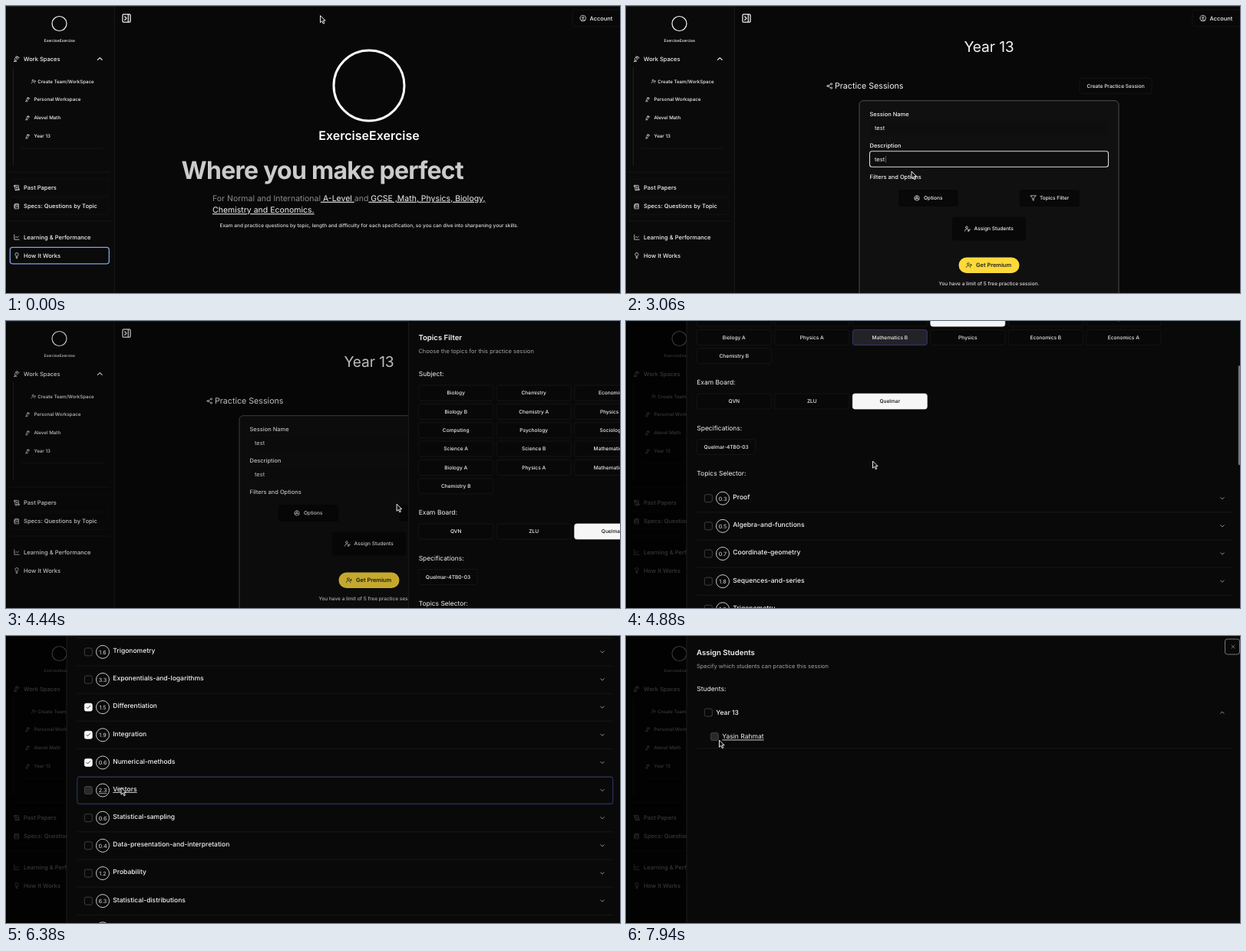
An HTML page for the animation above (8000 ms loop, 800x375 px).

```html
<!DOCTYPE html>
<html lang="en">
<head>
<meta charset="utf-8">
<title>Study workspace</title>
<style>
html, body { margin: 0; height: 100%; overflow: hidden; background: #080808; }
svg { display: block; width: 100vw; height: 100vh; font-family: Inter, "Liberation Sans", sans-serif; }
text { white-space: pre; text-rendering: geometricPrecision; }
</style>
</head>
<body>
<svg id="stage" viewBox="0 0 800 375"></svg>
<script>
const LOOP = 8000, SHEET_X = 79, SHEET_W = 721;

// ---- drawing helpers: all return markup; text y is the middle of the line
const text = (x, y, size, str, { w = 500, c = '#f4f4f4', a = 'start', more = '' } = {}) =>
  `<text x="${x}" y="${y + size * 0.36}" font-size="${size}" font-weight="${w}" fill="${c}" text-anchor="${a}" ${more}>${str}</text>`;
const mid = (x, y, size, str, o = {}) => text(x, y, size, str, { ...o, a: 'middle' });
const rect = (x, y, w, h, r = 0, fill = 'none', stroke = 'none', sw = 0.7) =>
  `<rect x="${x}" y="${y}" width="${w}" height="${h}" rx="${r}" fill="${fill}" stroke="${stroke}" stroke-width="${sw}"/>`;
const line = (x, y, x2, y2, c = '#1b1b1b') =>
  `<path d="M${x} ${y}L${x2} ${y2}" stroke="${c}" stroke-width=".8"/>`;
const group = (body, attrs = '') => `<g ${attrs}>${body}</g>`;
const circle = (x, y, r) => `M${x - r} ${y}a${r} ${r} 0 1 0 ${2 * r} 0a${r} ${r} 0 1 0 ${-2 * r} 0`;

const person = circle(9, 7, 4) + 'M2 21v-1a6 6 0 0 1 6-6h3a6 6 0 0 1 6 6v1';
const ICONS = {
  lamp: 'm14 5-3 3 2 7 8-8-7-2Zm0 0-3 3-3-3 3-3 3 3ZM9.5 6.5 4 12l3 6M3 22v-2c0-1.1.9-2 2-2h4a2 2 0 0 1 2 2v2H3Z',
  scroll: 'M8 21h12a2 2 0 0 0 2-2v-2H10v2a2 2 0 1 1-4 0V5a2 2 0 1 0-4 0v3h4M19 17V5a2 2 0 0 0-2-2H4M15 8h-5M15 12h-5',
  specs: 'M5 4h14v17H5zM9 2v4M15 2v4M2 9h6M2 15h6M11 10h5M11 14h5',
  chart: 'M3 3v18h18M19 9l-5 5-4-4-3 3',
  bulb: 'M15 14c.2-1 .7-1.7 1.5-2.5 1-.9 1.5-2.2 1.5-3.5A6 6 0 0 0 6 8c0 1 .2 2.2 1.5 3.5.7.7 1.3 1.5 1.5 2.5zM9 18h6M10 22h4',
  up: 'M18 15l-6-6-6 6',
  down: 'M6 9l6 6 6-6',
  cross: 'M18 6 6 18M6 6l12 12',
  check: 'M20 6 9 17l-5-5',
  panel: 'M5 3h14a2 2 0 0 1 2 2v14a2 2 0 0 1-2 2H5a2 2 0 0 1-2-2V5a2 2 0 0 1 2-2zM16 3v18M8 8l4 4-4 4',
  account: circle(12, 12, 10) + circle(12, 10, 3) + 'M7 20.7V19a2 2 0 0 1 2-2h6a2 2 0 0 1 2 2v1.7',
  share: circle(18, 5, 3) + circle(6, 12, 3) + circle(18, 19, 3) + 'M8.6 13.5l6.8 4M15.4 6.5l-6.8 4',
  gear: circle(12, 12, 9) + circle(12, 12, 3) + 'M12 3v6M4 16l5-2.5M20 16l-5-2.5',
  filter: 'M22 3H2l8 9.5V19l4 2v-8.5z',
  addUser: person + 'M19 8v6M16 11h6',
  editUser: person + 'M14 19l6-6 2 2-6 6h-2z',
  loader: 'M21 12a9 9 0 1 1-6.2-8.6'
};
const icon = (name, x, y, size, c = '#eee', sw = 2, turn = 0) =>
  `<path d="${ICONS[name]}" transform="translate(${x} ${y}) rotate(${turn}) scale(${size / 24}) translate(-12 -12)" fill="none" stroke="${c}" stroke-width="${sw}" stroke-linecap="round" stroke-linejoin="round"/>`;
const checkbox = (x, y, on, hover) =>
  rect(x - 5, y - 5, 10, 10, 2.2, on ? '#fafafa' : hover ? '#292929' : 'none', on ? '#fafafa' : '#555') +
  (on ? icon('check', x, y, 7, '#111', 2.8) : '');
const button = (x, y, w, h, str, o = {}) =>
  rect(x, y - h / 2, w, h, 3, o.fill || '#080808', o.stroke || '#1b1b1b') +
  mid(x + w / 2, y, 6.6, str, { c: o.c || '#eee' });
const closeButton = rect(780.5, 4, 19, 20, 3, 'none', '#777', 1) + icon('cross', 791, 14, 8, '#999');

// ---- timing helpers
const ease = (t, a, b) => {
  const u = Math.min(1, Math.max(0, (t - a) / (b - a)));
  return u * u * (3 - 2 * u);
};
const track = (keys, t) => {
  const i = keys.findIndex(k => k[0] > t);
  if (i === 0) return keys[0].slice(1);
  if (i < 0) return keys[keys.length - 1].slice(1);
  const a = keys[i - 1], b = keys[i], u = ease(t, a[0], b[0]);
  return a.slice(1).map((v, j) => v + (b[j + 1] - v) * u);
};
const between = (t, a, b) => t >= a && t < b;
const typed = (str, t, start) => str.slice(0, Math.max(0, Math.floor((t - start) / 50)));

const POINTER = [
  [60, 409.5, 12.5], [300, 546, 110], [780, 70, 173], [900, 68, 173], [1330, 68, 173],
  [1650, 724, 118], [1720, 724, 118], [1850, 640, 104], [1930, 640, 104], [2220, 400, 160],
  [2700, 400, 160], [2790, 376, 201], [2850, 376, 201], [3000, 372, 216], [3070, 372, 216],
  [3180, 394, 252], [3270, 394, 252], [3800, 107, 114], [4060, 107, 114], [4280, 552, 252],
  [4350, 552, 252], [4680, 321.5, 183], [5300, 321.5, 183], [5600, 150, 95], [5760, 150, 95],
  [5910, 150, 128], [5970, 150, 128], [6120, 150, 162], [6180, 150, 162], [6340, 150, 198],
  [6480, 150, 198], [6620, 66, 166], [7000, 66, 166], [7230, 473, 291], [7290, 473, 291],
  [7520, 140, 100], [7610, 140, 100], [7740, 118, 181], [7810, 118, 181], [7930, 121.5, 136]
];
const SCROLL = [[4740, 0], [4880, 170], [5450, 525.5]];

// ---- fixed parts
const sidebar =
  rect(0, 0, 141, 375, 0, '#0a0a0a') + line(141.3, 0, 141.3, 375, '#202020') +
  `<circle cx="69.5" cy="23" r="9.5" fill="none" stroke="#f4f4f4" stroke-width="1.2"/>` +
  mid(69.7, 44.7, 5, 'ExerciseExercise') +
  icon('lamp', 14, 69, 8.5) + text(23, 69, 7.5, 'Work Spaces') + icon('up', 122.3, 69, 11.5, '#f4f4f4', 2.4) +
  line(9.4, 80, 9.4, 208, '#2a2a2a') +
  icon('addUser', 36, 98.5, 6.5) + text(41.3, 98.5, 6.13, 'Create Team/WorkSpace') +
  ['Personal Workspace', 'Alevel Math', 'Year 13'].map((s, i) =>
    icon('lamp', 28.5, 122 + 24.1 * i, 6.5) + text(36.4, 122 + 24.1 * i, 6.2, s)).join('') +
  line(20, 186, 126, 186) + line(4, 217, 136, 217) + line(4, 281, 136, 281) +
  rect(5, 226.5, 129, 22, 3, 'none', '#141414') + rect(5, 250.5, 129, 22, 3, 'none', '#141414') +
  [['scroll', 237.5, 'Past Papers'], ['specs', 261.7, 'Specs: Questions by Topic'],
   ['chart', 302, 'Learning &amp; Performance'], ['bulb', 326, 'How It Works']].map(([i, y, s]) =>
    icon(i, 14, y, 8.5) + text(23, y, 7.55, s)).join('');

const header = line(0, 0.4, 800, 0.4, '#2c2c2c') + icon('panel', 157, 16, 13.5, '#f4f4f4', 2.2) +
  rect(738, 5, 66, 22, 3, 'none', '#171717') + icon('account', 751.8, 16, 9) + text(760.4, 16, 7.47, 'Account');

const link = s => `<tspan fill="#f4f4f4" text-decoration="underline">${s}</tspan>`;
const home =
  `<circle cx="473" cy="104" r="46" fill="none" stroke="#fff" stroke-width="3"/>` +
  mid(473, 169.5, 16, 'ExerciseExercise', { w: 600, c: '#fff' }) +
  text(228.5, 214, 32, 'Where you make perfect', { w: 700, c: '#cbcbcb', more: 'letter-spacing="-.74"' }) +
  text(269, 251, 10.5, `For Normal and International${link(' A-Level ')}and${link(' GCSE ,Math, Physics, Biology,')}`, { w: 400, c: '#8b8b8b' }) +
  text(269, 266.5, 10.5, link('Chemistry and Economics.'), { w: 400 }) +
  text(278.5, 287, 6.53, 'Exam and practice questions by topic, length and difficulty for each specification, so you can dive into sharpening your skills.', { c: '#ddd' });

const yearPage =
  mid(473, 53, 19.2, 'Year 13', { w: 400, more: 'letter-spacing="-.12"' }) +
  icon('share', 265.3, 104.5, 9) +
  text(272, 104.5, 10.67, 'Practice Sessions', { w: 400 }) +
  button(591, 104.2, 94, 20, 'Create Practice Session');

const formBase =
  rect(304, 123.7, 338, 270, 5, '#101011', '#4c4c4c', 1) +
  text(317.5, 141, 7.47, 'Session Name') + text(317.5, 182, 7.47, 'Description') +
  text(317.5, 223, 7.47, 'Filters and Options') +
  rect(355, 240, 78, 22, 3, '#080808') + icon('gear', 379, 251, 8.5) + text(388, 251, 6.6, 'Options') +
  rect(512.5, 240, 78.5, 22, 3, '#080808') + icon('filter', 530.5, 251, 8.5) + text(539, 251, 6.5, 'Topics Filter') +
  rect(425, 275.5, 96, 31, 3, '#080808') + icon('editUser', 445, 291, 8.5) + text(453.5, 291, 6.6, 'Assign Students') +
  rect(433.5, 328.5, 79, 20.5, 10.2, '#fdda3a') + icon('addUser', 447, 338.7, 8.5, '#222') +
  text(456, 338.7, 7.4, 'Get Premium', { w: 600, c: '#222' }) +
  mid(473, 362.5, 6.5, 'You have a limit of 5 free practice session.', { c: '#ddd' });

const sheetHead = (title, note) =>
  text(92, 21.5, 9.6, title, { w: 600 }) + text(92, 39.5, 7.47, note, { w: 400, c: '#a0a0a0' }) + closeButton;

const setting = (y, label, value) =>
  text(97, y, 7.47, label) + rect(97, y + 8.5, 690, 20, 3, 'none', '#151515') + text(104, y + 18.3, 7.47, value, { w: 400 });
const option = (x, y, label, on) => checkbox(x, y, on) + text(x + 10, y, 8.53, label, { w: 400 });
const optionsSheet = sheetHead('Options', 'Design key aspects of your practice session') +
  setting(62, 'Number of practice questions', 20) +
  setting(111.5, 'Marks Per Question (length)', 1) +
  setting(161, 'Difficulty range (Easy 1-5 Hard)', 3) +
  option(98, 213.5, 'Only Past Paper Exam Questions', true) +
  option(98, 249.5, 'Only Questions with Answers', false) +
  option(98, 285, 'Show Hints', true) + option(177, 285, 'Show Answers', true);

const SUBJECTS = ['Biology', 'Chemistry', 'Economics', 'Further Maths', 'Statistics', 'Mechanics',
  'Biology B', 'Chemistry A', 'Physics B', 'Core Maths', 'Geography', 'History',
  'Computing', 'Psychology', 'Sociology', 'Business', 'Accounting', 'Geology',
  'Science A', 'Science B', 'Mathematics A', 'Mathematics', 'Economics C', 'Physics C',
  'Biology A', 'Physics A', 'Mathematics B', 'Physics', 'Economics B', 'Economics A', 'Chemistry B'];
const TOPICS = [['Proof', 0.3], ['Algebra-and-functions', 0.5], ['Coordinate-geometry', 0.7],
  ['Sequences-and-series', 1.8], ['Trigonometry', 1.6], ['Exponentials-and-logarithms', 3.3],
  ['Differentiation', 1.5], ['Integration', 1.9], ['Numerical-methods', 0.6], ['Vectors', 2.3],
  ['Statistical-sampling', 0.6], ['Data-presentation-and-interpretation', 0.4], ['Probability', 1.2],
  ['Statistical-distributions', 6.3], ['Hypothesis-testing', 0.8]];
const CLICKS = { 6: 5740, 7: 5950, 8: 6160, 9: 6420 };
const HOVERS = [[6, 5580], [7, 5860], [8, 6070], [9, 6270], [-1, 6530]];
const WHITE = { fill: '#f6f6f6', stroke: '#f6f6f6', c: '#111' };
const column = i => 92.3 + 101.5 * i;

// ---- moving parts
const field = (y, str, focused) =>
  rect(317.5, y - 10.2, 311, 20.4, 3, '#0e0e0f', focused ? '#d8d8d8' : '#151515', focused ? 1.1 : 0.7) +
  text(324, y, 7.47, str + (focused ? '<tspan font-weight="200">|</tspan>' : ''), { w: 400 });

const form = t => formBase +
  field(159.5, typed('test', t, 2500), between(t, 2440, 2790)) +
  field(200, typed('test', t, 2820), between(t, 2790, 3230));

function topicsSheet(t) {
  const [scroll] = track(SCROLL, t);
  const hot = between(t, 4600, 5000);
  const hover = (HOVERS.filter(h => h[1] <= t).pop() || [-1])[0];
  const ringed = (HOVERS.filter(h => h[0] > 0 && h[1] + 60 <= t).pop() || [-1])[0];
  let out = sheetHead('Topics Filter', 'Choose the topics for this practice session') +
    text(92.3, 69, 8.53, 'Subject:', { w: 400 });
  SUBJECTS.forEach((s, i) => {
    const look = s === 'Mathematics' ? WHITE
      : hot && s === 'Mathematics B' ? { fill: '#232327', stroke: '#3c4a9c' } : {};
    out += button(column(i % 6), 94 + 24.35 * Math.floor(i / 6), 97, 20, s, look);
  });
  out += text(92.3, 250, 8.45, 'Exam Board:', { w: 400 }) +
    ['QVN', 'ZLU', 'Quelmar'].map((s, i) => button(column(i), 275, 97, 20, s, i === 2 ? WHITE : {})).join('') +
    text(92.3, 309.5, 8.45, 'Specifications:', { w: 400 }) +
    button(92.3, 334.5, 76.5, 20, 'Quelmar-4TB0-03') +
    text(92.3, 368.7, 8.45, 'Topics Selector:', { w: 400 });
  TOPICS.forEach(([name, n], i) => {
    const y = 401.7 + 36.15 * i, under = i === hover ? 'text-decoration="underline"' : '';
    out += line(92.3, y + 18.2, 791, y + 18.2) +
      (i === ringed ? rect(92.8, y - 17.3, 698, 35, 3, 'none', '#2f3a78', 1) : '') +
      checkbox(107.3, y, t >= CLICKS[i], i === hover) +
      `<circle cx="126" cy="${y}" r="8.5" fill="none" stroke="#ddd" stroke-width=".9"/>` +
      mid(126, y + 0.3, 7.2, n.toFixed(1), { w: 400, c: '#ddd', more: under }) +
      text(139.3, y - 1.7, 8.53, name, { more: under }) + icon('down', 777, y, 9, '#bbb');
  });
  const bar = ease(t, 4740, 4800) * (1 - ease(t, 5480, 5620));
  return group(out, `transform="translate(0 ${-scroll})"`) +
    group(rect(797.8, scroll * 0.342, 2.2, 130, 1, '#777'), `opacity="${bar}"`);
}

function assignSheet(t) {
  const open = t >= 7600, hover = t >= 7870;
  return sheetHead('Assign Students', 'Specify which students can practice this session') +
    text(92.3, 69.3, 8.53, 'Students:', { w: 400 }) +
    checkbox(107.3, 100, false) + text(117.3, 100, 8.53, 'Year 13') +
    icon(open ? 'up' : 'down', 777, 100, 9, '#bbb') +
    (open ? checkbox(115.4, 131.4, false, hover) +
      text(125.3, 131.4, 8.53, 'Yasin Rahmat', { w: 400, more: hover ? 'text-decoration="underline"' : '' }) : '') +
    line(92.3, open ? 146.8 : 118, 791, open ? 146.8 : 118);
}

function sheet(t, body, start, end, leave, gone) {
  const v = ease(t, start, end) * (1 - ease(t, leave, gone));
  if (!v) return '';
  return rect(0, 0, 800, 375, 0, `rgba(0,0,0,${0.78 * v ** 1.3})`) +
    group(rect(SHEET_X, 0, SHEET_W, 375, 0, '#090909') + line(SHEET_X, 0, SHEET_X, 375, '#222') + body(t),
      `transform="translate(${SHEET_W * (1 - v)} 0)"`);
}

function pointer(t) {
  const [x, y] = track(POINTER, t);
  return `<path transform="translate(${x} ${y})" d="M0 0V9.2L2.2 7.2 3.8 10.7 5.3 10 3.8 6.6H6.6Z" fill="#111" stroke="#fff" stroke-width=".9" stroke-linejoin="round"/>`;
}

function scene(t) {
  const ring = 1 - ease(t, 700, 1000);
  let out = rect(0, 0, 800, 375, 0, '#080808') + sidebar + header +
    group(rect(5.3, 315.3, 129, 21.5, 3.2, 'none', '#7fa6e6', 1.3), `opacity="${ring}"`);
  if (between(t, 940, 1850)) out += rect(20.8, 159.4, 105, 21.4, 3.2, 'none', '#7fa6e6', 1.3);
  if (t < 1000) out += home;
  else if (t < 1450) out += icon('loader', 473, 55.5, 13.5, '#eee', 2, 196 + (t - 1250) * 0.9);
  else out += yearPage;
  if (t >= 1950) out += form(t);
  return out +
    sheet(t, () => optionsSheet, 3260, 3480, 3846, 4051) +
    sheet(t, topicsSheet, 4340, 4580, 7010, 7210) +
    sheet(t, assignSheet, 7270, 7480, 9000, 9200) +
    pointer(t);
}

const stage = document.getElementById('stage');
const begin = performance.now();
function tick() {
  stage.innerHTML = scene((performance.now() - begin) % LOOP);
  requestAnimationFrame(tick);
}
tick();
</script>
</body>
</html>
```
